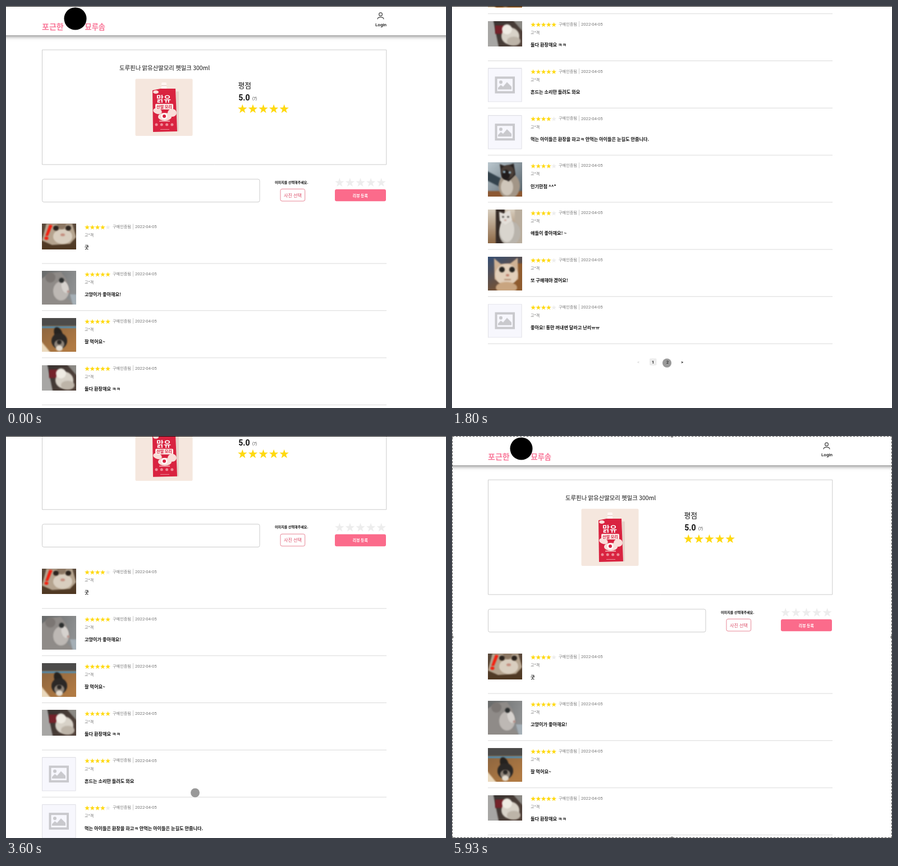
Recreate the animation shown at these times as an HTML page with a canvas. Size 784x715 px, loop 6.05 s.

```html
<!DOCTYPE html>
<html lang="ko">
<head>
<meta charset="utf-8">
<title>Pet shop reviews</title>
<style>
html, body { margin: 0; width: 100%; height: 100%; overflow: hidden; background: #fff; }
canvas { display: block; }
</style>
</head>
<body>
<canvas id="stage" width="784" height="715"></canvas>
<script>
const W = 784, H = 715, LOOP = 6050, STEP = 100;
const stage = document.getElementById('stage').getContext('2d');
let ctx = stage;
const PINK = '#fb6b8b', GOLD = '#ffd90f', PALE = '#ededed';
const SANS = '"Noto Sans CJK KR", "Noto Sans CJK", sans-serif';
const LATIN = 'Roboto, sans-serif';
const ROW_TOP = 387, ROW_STEP = 83.85, THUMB = 60.5, BOTTOM = 612;

// y is the optical middle of the line
function text(s, x, y, size, color = '#111', weight = 500, family = SANS, align = 'left') {
  ctx.font = `${weight} ${size}px ${family}`;
  ctx.textAlign = align;
  ctx.fillStyle = color;
  ctx.fillText(s, x, y + size * 0.37);
}

function rect(color, x, y, w, h, r = 0) {
  ctx.fillStyle = color;
  ctx.beginPath();
  ctx.roundRect(x, y, w, h, r);
  ctx.fill();
}

function outline(color, x, y, w, h, r = 0) {
  ctx.strokeStyle = color;
  ctx.lineWidth = 1;
  ctx.beginPath();
  ctx.roundRect(x, y, w, h, r);
  ctx.stroke();
}

function oval(color, x, y, rx, ry = rx, turn = 0) {
  ctx.fillStyle = color;
  ctx.beginPath();
  ctx.ellipse(x, y, rx, ry, turn, 0, Math.PI * 2);
  ctx.fill();
}

function poly(color, ...p) {
  ctx.fillStyle = color;
  ctx.beginPath();
  for (let i = 0; i < p.length; i += 2) ctx.lineTo(p[i], p[i + 1]);
  ctx.fill();
}

function shade(from, to, x = 0, y = THUMB) {
  const g = ctx.createLinearGradient(0, 0, x, y);
  g.addColorStop(0, from);
  g.addColorStop(1, to);
  ctx.fillStyle = g;
  ctx.fillRect(-8, -8, THUMB + 16, THUMB + 16);
}

function stars(x, y, r, step, filled) {
  for (let i = 0; i < 5; i++) {
    const p = [];
    for (let k = 0; k < 10; k++) {
      const a = k * Math.PI / 5 - Math.PI / 2, d = k % 2 ? r * 0.4 : r;
      p.push(x + i * step + d * Math.cos(a), y + d * Math.sin(a));
    }
    poly(i < filled ? GOLD : PALE, ...p);
  }
}

const photos = {
  closeUp() {
    shade('#5b4a3c', '#4f3822', 0, 45);
    poly('#b5a48f', 8, 0, 54, 0, 61, 24, 50, 36, 18, 38, 0, 30);
    oval('#d9cebf', 37, 23, 17, 13);
    oval('#8c7763', 35, 2, 8, 8);
    oval('#2b231d', 25, 8, 5, 4.5);
    oval('#2b231d', 47, 8, 5, 4.5);
    oval('#c48f80', 37, 20, 4, 2.5);
    poly('#f3200f', 13, 2, 19, 3, 11, 22, 6, 22);
    oval('#f3200f', 8, 26, 3.5, 3);
  },
  profile() {
    shade('#686a6a', '#8d8f90', THUMB, 20);
    poly('#8f8b88', -4, 16, 16, 4, 34, 2, 44, 16, 50, 38, 42, 46, 61, 65, -4, 65);
    oval('#bdb8b4', 34, 36, 14, 17);
    oval('#d6d2ce', 41, 29, 6, 11, -0.3);
    oval('#7b7673', 15, 12, 9, 9);
    oval('#2b2e2e', 35, 17, 4.5, 4.5);
    oval('#b48f87', 47, 37, 2.5, 2);
    poly('#a5afb6', 50, 42, 65, 42, 65, 65, 56, 65);
  },
  floor() {
    shade('#86613f', '#b07a43', 40, THUMB);
    rect('#4c4b4a', -4, -4, 69, 18);
    rect('#4b8fb9', -4, 15, 69, 3);
    poly('#ead9bd', -4, 38, 18, 65, -4, 65);
    oval('#25221f', 29, 27, 7, 11, -0.4);
    oval('#2b2826', 31, 41, 14, 14);
    oval('#8f857a', 31, 47, 9, 8);
    oval('#2b2826', 31, 43, 4, 4);
    oval('#e4dcd0', 31, 54, 6, 5);
  },
  window() {
    shade('#34302f', '#54443c', THUMB, 40);
    poly('#a7a6a4', -4, -4, 9, -4, 20, 50, -4, 50);
    rect('#74222a', 13, 8, 16, 15);
    poly('#8b8984', 42, -4, 65, -4, 65, 22);
    oval('#d8d2c8', 40, 27, 16, 15);
    oval('#efebe3', 34, 15, 9, 9);
    oval('#bdb4a8', 46, 36, 12, 8);
  },
  siamese() {
    shade('#bac7ce', '#525e66', THUMB, THUMB);
    poly('#34434d', -4, 14, 26, 30, 22, 44, -4, 31);
    rect('#8c5832', -4, 51, 69, 14);
    oval('#a39687', 38, 42, 19, 23);
    oval('#cfc6ba', 34, 44, 11, 15);
    poly('#282321', 21, 3, 31, 7, 46, 2, 49, 22, 37, 34, 25, 27);
    oval('#4a3f38', 35, 17, 12, 12);
    oval('#211c1b', 32, 22, 7, 9);
    oval('#9dbbca', 29, 17, 2.3, 2);
    oval('#9dbbca', 39, 18, 2.3, 2);
  },
  sitting() {
    shade('#d8cebf', '#8c6744', 0, THUMB);
    rect('#362c27', 14, -4, 16, 69);
    rect('#b9ad9d', 48, -4, 17, 69);
    oval('#b9b4ac', 39, 42, 19, 22);
    oval('#d9d5ce', 34, 36, 13, 22);
    poly('#e3dfd9', 20, 4, 28, 7, 39, 1, 43, 19, 31, 27, 21, 20);
    oval('#4d4b46', 27, 13, 2, 1.6);
    oval('#4d4b46', 36, 13, 2, 1.6);
    oval('#c69d92', 31, 19, 2, 1.3);
  },
  faceOn() {
    shade('#344e75', '#80522a', 35, THUMB);
    rect('#8f5c2f', 47, 12, 18, 53);
    poly('#cfb295', 11, 3, 23, 13, 40, 12, 53, 2, 54, 40, 32, 54, 12, 40);
    oval('#e2cfba', 33, 32, 20, 19);
    oval('#c9a580', 33, 55, 19, 10);
    oval('#272420', 25, 23, 5, 5);
    oval('#272420', 43, 23, 5, 5);
    oval('#bd7f6c', 35, 33, 3, 2);
    rect('#a07457', 29, 40, 12, 1.5, 1);
  },
  dark() {
    shade('#4b5148', '#8b9485', THUMB, 10);
    for (let i = 0; i < 5; i++) poly('#a0a797', 40 + i * 6, -4, 42 + i * 6, -4, 32 + i * 6, 50, 29 + i * 6, 50);
    oval('#1b1d1a', 18, 10, 24, 14, 0.3);
    poly('#1b1d1a', 29, 0, 41, 7, 40, 20, 24, 20);
    oval('#9a715d', 7, 39, 14, 9, -0.5);
  },
  sleepy() {
    shade('#e0dfdc', '#bab5ae', 0, THUMB);
    rect('#45403d', -4, 53, 28, 12);
    oval('#d4cdc4', 45, 46, 23, 22);
    poly('#ded8d0', 10, 24, 22, 24, 42, 28, 49, 14, 56, 33, 45, 54, 19, 56, 8, 43);
    oval('#eae5de', 25, 42, 16, 14);
    poly('#c4a69c', 44, 28, 49, 18, 53, 31);
    rect('#83776e', 16, 38, 7, 1.2);
    rect('#83776e', 31, 39, 7, 1.2);
    oval('#c59a91', 23, 46, 3, 1.8);
  },
  none() {
    rect('#f7f7fd', 0, 0, THUMB, THUMB);
    outline('#e0e0e6', 0.5, 0.5, THUMB - 1, THUMB - 1);
    rect('#c9c9cd', 12.5, 15, 35.5, 30);
    rect('#f7f7fd', 16.5, 19, 27.5, 22);
    oval('#c9c9cd', 23, 25, 3);
    poly('#c9c9cd', 18, 38, 18, 35, 23, 30, 27, 33, 34, 25, 42, 33, 42, 38);
  }
};

const WIDE = ['closeUp', 'window', 'dark'];
const pages = [
  [
    ['closeUp', 4, '굿'],
    ['profile', 5, '고양이가 좋아해요!'],
    ['floor', 5, '잘 먹어요~'],
    ['window', 5, '둘다 환장해요 ㅋㅋ'],
    ['none', 5, '흔드는 소리만 들려도 와요'],
    ['none', 4, '먹는 아이들은 환장을 하고ㅋ 안먹는 아이들은 눈길도 안줍니다.'],
    ['siamese', 4, '인기만점 ^^*'],
    ['sitting', 4, '애들이 좋아해요! ~'],
    ['faceOn', 4, '또 구매해야 겠어요!'],
    ['none', 4, '좋아요! 통만 꺼내면 달라고 난리ㅠㅠ']
  ],
  [
    ['dark', 5, '흔드는 소리만 들려도 와요!'],
    ['sleepy', 5, '리뷰 입니다.'],
    ['siamese', 5, '리뷰 입니다.']
  ]
];

// Photos are painted once, slightly out of focus
function paintThumb(name) {
  const canvas = document.createElement('canvas');
  canvas.width = canvas.height = 61;
  ctx = canvas.getContext('2d');
  if (name !== 'none') ctx.filter = 'blur(1.2px)';
  photos[name]();
  ctx = stage;
  return canvas;
}
const thumbs = Object.fromEntries(Object.keys(photos).map(name => [name, paintThumb(name)]));

function drawHeader() {
  ctx.save();
  ctx.shadowColor = 'rgba(0,0,0,.5)';
  ctx.shadowBlur = 7;
  ctx.shadowOffsetY = 2;
  rect('#fff', -10, -20, W + 20, 72);
  ctx.restore();
  oval('#000', 123.5, 22.5, 20);
  text('포근한', 64, 37, 14, '#f9799a', 900);
  text('묘루솜', 140.5, 37, 13.2, '#f9799a', 900);
  ctx.strokeStyle = '#444';
  ctx.lineWidth = 1.2;
  ctx.beginPath();
  ctx.arc(667.5, 14.8, 2.9, 0, Math.PI * 2);
  ctx.moveTo(662, 23.5);
  ctx.bezierCurveTo(662, 18.6, 673, 18.6, 673, 23.5);
  ctx.stroke();
  text('Login', 668, 33, 8.1, '#111', 500, LATIN, 'center');
}

function drawPack() {
  rect('#f5e7de', 230.5, 129.5, 102, 101.5, 2);
  rect('#e6d3ca', 303, 152, 5, 71);
  rect('#fff6f2', 277, 136, 9, 13, 2);
  rect('#ddc7c0', 277, 141, 9, 1);
  poly('#d92340', 261, 150, 275, 147, 302, 147, 305, 223, 262, 224);
  oval('#f9ded9', 270, 187, 8, 5, 0.3);
  oval('#f9ded9', 296, 190, 8, 7);
  oval('#f9ded9', 283, 197, 12, 7);
  oval('#f9ded9', 267, 153, 5, 3);
  text('맑유', 281, 165, 14, '#fff', 900, SANS, 'center');
  rect('#fbe9e5', 266, 174, 32, 10, 2);
  text('산딸 모리', 282, 179, 7, '#d92340', 700, SANS, 'center');
  oval('#fff', 282, 196, 5.5);
  oval('#d92340', 282, 196, 3);
  rect('#f4bcc1', 273, 204, 19, 1.5);
  for (let i = 0; i < 4; i++) oval('#ee8c98', 268 + i * 9.3, 211, 2.5);
  rect('#ee8c98', 275, 219, 16, 1);
}

function drawProduct() {
  outline('#ccc', 64.5, 78, 613.3, 204);
  text('도루핀나 맑유산딸모리 펫밀크 300ml', 202, 110, 10.4);
  drawPack();
  text('평점', 413.5, 141, 12.8);
  text('5.0', 414.3, 163.3, 14, '#111', 700, LATIN);
  text('(7)', 439, 165, 6.4, '#333', 400, LATIN);
  stars(421.3, 183.4, 8.6, 18.6, 5);
}

function drawForm() {
  outline('#ccc', 64.5, 308, 387.5, 40.7, 3);
  text('이미지를 선택해주세요.', 479, 313.3, 6.1, '#111', 700);
  outline('#e88797', 489, 325.5, 43.7, 21.5, 3);
  text('사진 선택', 511, 336.5, 8.2, '#dc4d68', 500, SANS, 'center');
  stars(594.3, 314.3, 8.6, 18.6, 0);
  rect(PINK, 586, 326, 91, 21.3, 3);
  text('리뷰 등록', 631.3, 337, 6.9, '#fff', 700, SANS, 'center');
}

function drawReview([photo, score, comment], top) {
  const h = WIDE.includes(photo) ? 45.5 : THUMB;
  ctx.drawImage(thumbs[photo], 0, 0, THUMB, h, 64, top, THUMB, h);
  stars(144.6, top + 6.8, 4.7, 9.25, score);
  text('구매인증됨', 190, top + 5.5, 7.15, '#777', 400);
  rect('#ccc', 226, top + 0.5, 1, 10);
  text('2022-04-05', 230, top + 5.5, 7.65, '#777', 400, LATIN);
  text('고*객', 140, top + 20.8, 7, '#777', 400);
  text(comment, 140, top + 42.4, 8.18, '#111', 700);
  rect('#dadada', 64, top + 70.5, 614, 1);
}

function drawPager(page, y) {
  rect('#ececec', 352 + page * 26, y - 6.3, 12.5, 12.6, 2);
  ['<', '1', '2', '>'].forEach((label, i) => {
    const off = i === (page ? 3 : 0);
    const bold = i === page + 1 || ((i === 0 || i === 3) && !off);
    text(label, 332 + i * 26, y, 7.2, off ? '#c4c4c4' : '#111', bold ? 700 : 400, LATIN, 'center');
  });
}

function ease(t, from, to) {
  const x = Math.min(1, Math.max(0, (t - from) / (to - from)));
  return x * x * (3 - 2 * x);
}

function scrollAt(t) {
  if (t < 2000) return BOTTOM * ease(t, 720, 1150);
  return BOTTOM * (ease(t, 3460, 3892) - ease(t, 4075, 4410));
}

function drawCursor(t) {
  if (t < 500 || t >= 4750) return;
  const over = ease(t, 1150, 1750), back = ease(t, 2050, 2550), up = ease(t, 2700, 3100);
  oval('rgba(0,0,0,.4)', 699 - 316 * over - 45 * back - up, 388.5 + 246.5 * over + 32 * back - 32.5 * up, 8);
}

function drawSelection() {
  outline('#fff', 0.5, 0.5, W - 1, H - 1);
  ctx.setLineDash([4, 2]);
  outline('#444', 0.5, 0.5, W - 1, H - 1);
  ctx.setLineDash([]);
  for (const x of [0, W / 2, W])
    for (const y of [0, H / 2, H])
      if (x !== W / 2 || y !== H / 2) oval('#777', x, y, 2.6);
}

function draw(now) {
  const t = Math.floor(now / STEP) * STEP;
  const page = t >= 2000 && t < 2700 ? 1 : 0;
  const reviews = pages[page];
  rect('#fff', 0, 0, W, H);
  ctx.save();
  ctx.translate(0, -scrollAt(t));
  drawHeader();
  drawProduct();
  drawForm();
  reviews.forEach((review, i) => drawReview(review, ROW_TOP + i * ROW_STEP));
  drawPager(page, ROW_TOP + reviews.length * ROW_STEP + 19.5);
  ctx.restore();
  drawCursor(t);
  if (now >= 5925) drawSelection();
  else rect('#111', 0, 0, W, 1);
}

const start = performance.now();
function tick() {
  draw((performance.now() - start) % LOOP);
  requestAnimationFrame(tick);
}
tick();
</script>
</body>
</html>
```
